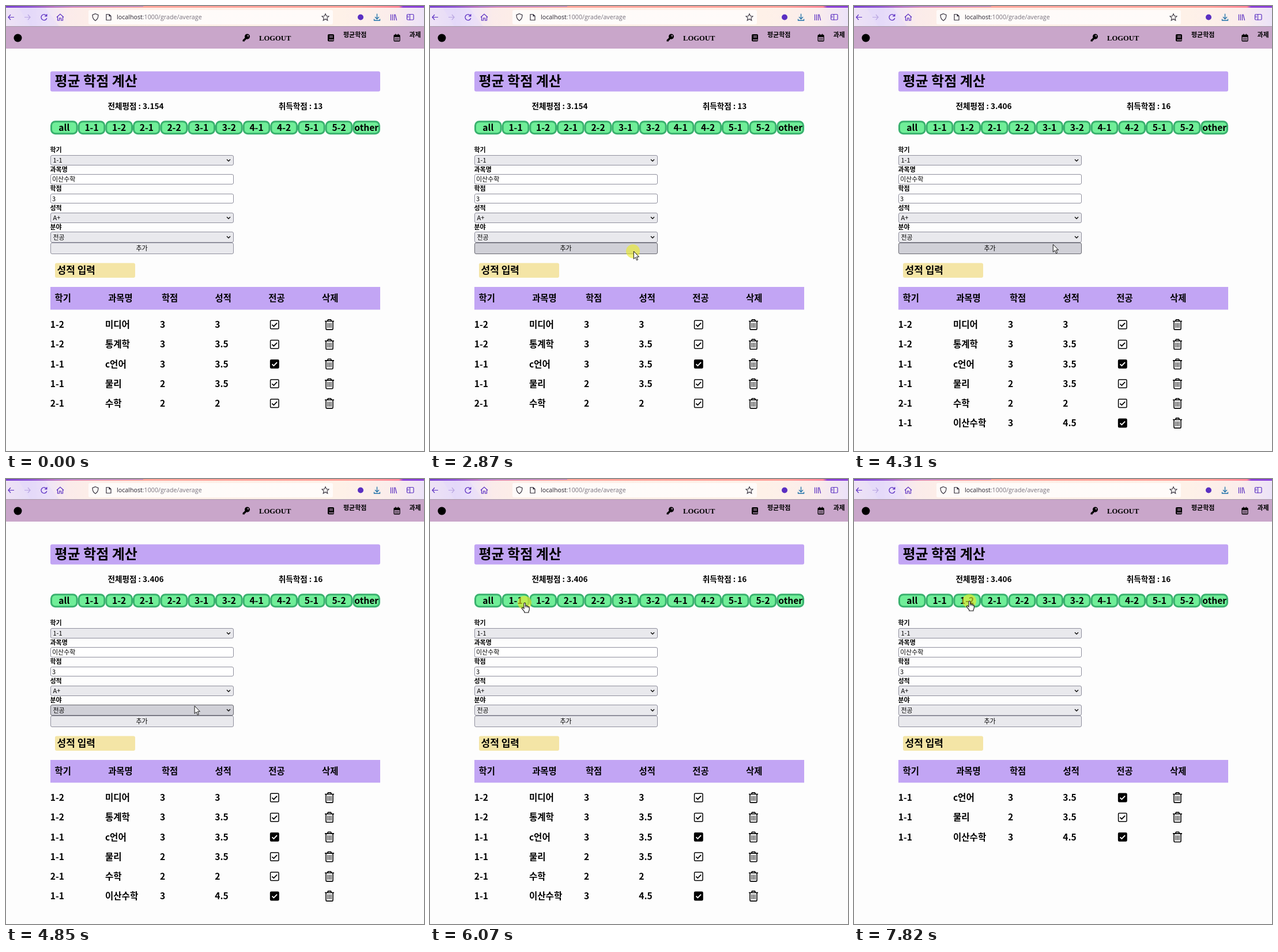
These frames come from a looping animation (725 by 773 pixels, 8 s). An HTML page with a canvas:

```html
<!DOCTYPE html>
<html lang="ko">
<head>
<meta charset="utf-8">
<title>평균 학점 계산</title>
<style>
html, body { margin: 0; width: 100%; height: 100%; overflow: hidden; background: #fdfdfd; }
canvas { display: block; }
</style>
</head>
<body>
<canvas id="stage" width="725" height="773"></canvas>
<script>
const ctx = document.getElementById('stage').getContext('2d');
const LOOP = 8000;
const KR = '"Noto Sans CJK KR", "Noto Sans CJK", sans-serif';
const LILAC = '#c2a5f4', INK = '#000', PURPLE = '#5a2fc2';

const ADD_TIME = 3320, CLEAR_TIME = 6270, FILTER_TIME = 6540;
const CLICKS = [[2870, 2980], [6052, 6200], [7820, LOOP]];
const PRESS = [2930, 2980];
// start, end, steps, x0, y0, x1, y1
const MOVES = [
  [1330, 1680, 6, 658, 418, 353, 426],
  [4310, 4450, 3, 345, 414, 332, 402],
  [4780, 5260, 8, 329, 398, 289, 328],
  [5460, 5978, 8, 285, 322, 165, 215],
  [7200, 7680, 7, 168, 215, 201, 212]
];

const FILTERS = ['all', '1-1', '1-2', '2-1', '2-2', '3-1', '3-2', '4-1', '4-2', '5-1', '5-2', 'other'];
const FIELDS = [
  { label: '학기', labelY: 250, y: 259, h: 18, value: '1-1', kind: 'select' },
  { label: '과목명', labelY: 284, y: 292, h: 18, value: '이산수학', kind: 'input' },
  { label: '학점', labelY: 317, y: 326, h: 17, value: '3', kind: 'input' },
  { label: '성적', labelY: 351, y: 359, h: 18, value: 'A+', kind: 'select' },
  { label: '분야', labelY: 384, y: 392, h: 19, value: '전공', kind: 'select' },
  { y: 411, h: 20, value: '추가', kind: 'button' }
];
const COURSES = [
  ['1-2', '미디어', '3', '3', false],
  ['1-2', '통계학', '3', '3.5', false],
  ['1-1', 'c언어', '3', '3.5', true],
  ['1-1', '물리', '2', '3.5', false],
  ['2-1', '수학', '2', '2', false],
  ['1-1', '이산수학', '3', '4.5', true]
];

const within = (t, [a, b]) => t >= a && t < b;

function text(str, x, cy, size, { weight = 700, align = 'left', color = INK, family = KR } = {}) {
  ctx.font = `${weight} ${size}px ${family}`;
  ctx.textAlign = align;
  ctx.fillStyle = color;
  ctx.fillText(str, x, cy + size * 0.37);
  return ctx.measureText(str).width;
}

function rect(x, y, w, h, fill) {
  ctx.fillStyle = fill;
  ctx.fillRect(x, y, w, h);
}

function box(x, y, w, h, r, fill, stroke, width = 1) {
  ctx.beginPath();
  ctx.roundRect(x, y, w, h, r);
  paint(fill, stroke, width);
}

function dot(x, y, r, fill, stroke, width = 1) {
  ctx.beginPath();
  ctx.arc(x, y, r, 0, Math.PI * 2);
  paint(fill, stroke, width);
}

function shape(d, x, y, fill, stroke, width = 1) {
  const path = new Path2D(d);
  ctx.save();
  ctx.translate(x, y);
  paint(fill, stroke, width, path);
  ctx.restore();
}

function paint(fill, stroke, width, path) {
  if (fill) {
    ctx.fillStyle = fill;
    path ? ctx.fill(path) : ctx.fill();
  }
  if (stroke) {
    ctx.strokeStyle = stroke;
    ctx.lineWidth = width;
    path ? ctx.stroke(path) : ctx.stroke();
  }
}

function gradient(x0, x1, stops) {
  const g = ctx.createLinearGradient(x0, 0, x1, 0);
  stops.forEach(([p, c]) => g.addColorStop(p, c));
  return g;
}

function drawBrowser() {
  rect(0, 0, 725, 36, gradient(0, 725, [
    [0, '#eee2f5'], [0.06, '#e6dcf8'], [0.1, '#efe5f7'], [0.15, '#fbebea'], [0.22, '#fdeee7'],
    [0.8, '#fef1e8'], [0.92, '#fbedeb'], [1, '#ece2f8']]));
  shape('M22 3H68L92 35H42Z', 0, 0, 'rgba(222,210,250,.3)');
  rect(0, 0, 725, 3, gradient(0, 725, [
    [0, '#7b40d2'], [0.06, '#8f55d4'], [0.16, '#e08fb4'], [0.33, '#ffa69b'], [0.85, '#ffa099'],
    [0.94, '#ff8698'], [0.95, '#8b40d8'], [1, '#8b40d8']]));
  rect(84, 0, 154, 1, '#a184dc');
  rect(0, 35, 725, 1, '#a99aa9');
  box(143, 7, 424, 25, 3, 'rgba(255,255,255,.75)');

  shape('M5 0H-5M-1 -4.5L-5 0L-1 4.5', 9, 19.5, null, PURPLE, 1.2);
  shape('M-5 0H5M1 -4.5L5 0L1 4.5', 37, 19.5, null, '#b9a6e2', 1.2);
  shape('M4.2 -2.5A5 5 0 1 0 4.8 1.5M4.8 -5.5V-2H1.2', 66, 19.5, null, PURPLE, 1.3);
  shape('M-6 0L0 -5.5L6 0M-4.5 -1V5.5H-1.5V1.5H1.5V5.5H4.5V-1', 94, 19.5, null, PURPLE, 1.2);
  shape('M0 -6L5 -4C5 1 3.5 4 0 6C-3.5 4 -5 1 -5 -4Z', 155, 19.5, null, '#35313d', 1.2);
  shape('M-4 -5H1L4 -2V5H-4ZM1 -5V-2H4', 178, 19.5, null, '#35313d', 1.2);
  shape('M0 -6L1.8 -2L6 -1.6L2.8 1.2L3.8 5.5L0 3.2L-3.8 5.5L-2.8 1.2L-6 -1.6L-1.8 -2Z', 554, 19.5, null, '#35313d', 1.1);
  const url = { weight: 400, family: '"Open Sans", "Noto Sans", sans-serif' };
  const hostWidth = text('localhost', 192, 19.5, 10.7, { ...url, color: '#26222e' });
  text(':1000/grade/average', 192 + hostWidth, 19.5, 10.7, { ...url, color: '#77717d' });

  dot(615, 19.5, 5, PURPLE);
  shape('M0 -6V3M-3.5 -.5L0 3L3.5 -.5M-5 3V5.5H5V3', 643.5, 19.5, null, '#1b6fa8', 1.3);
  shape('M-4.5 -5V5.5M-1.5 -5V5.5M1.5 -5V5.5M3 -5L5.5 5.5', 672, 19.5, null, PURPLE, 1.2);
  box(695.5, 14.5, 11.5, 9.5, 1.5, null, PURPLE, 1.2);
  shape('M0 -5V5M-4 -2H-2M-4 0H-2', 700.5, 19.5, null, PURPLE, 1.1);
}

function drawNav() {
  rect(0, 36, 725, 38, '#c9a6ca');
  dot(20.5, 55.5, 7, INK);
  // key
  shape('M0 0L-8 7.5V10H-4.5V8H-2.5V6H0L3 3Z', 418.5, 51.5, INK);
  dot(418.5, 53, 4.5, INK);
  dot(419.8, 51.8, 1.2, '#c9a6ca');
  text('LOGOUT', 439, 55.5, 12.6, { family: '"Liberation Serif", serif' });
  // book
  box(558, 49, 11, 12.5, 2, INK);
  rect(561, 51.5, 6, 1, '#c9a6ca');
  rect(561, 53.7, 6, 1, '#c9a6ca');
  rect(560, 58.2, 8.5, 1.3, '#c9a6ca');
  text('평균학점', 585, 50, 11, { weight: 900 });
  // calendar
  box(673, 50.5, 10, 10.5, 1.2, null, INK, 1.3);
  rect(673, 51, 10, 3, INK);
  rect(675, 48.5, 1.4, 3, INK);
  rect(679.7, 48.5, 1.4, 3, INK);
  for (let i = 0; i < 6; i++) rect(674.8 + i % 3 * 2.4, 55.4 + Math.floor(i / 3) * 2.4, 1.5, 1.5, INK);
  text('과제', 699.5, 50, 11, { weight: 900 });
}

function drawSummary(added) {
  box(77, 113.5, 572, 35, 3, LILAC);
  text('평균 학점 계산', 84.5, 130, 24);
  text(`전체평점 : ${added ? '3.406' : '3.154'}`, 225, 174, 13.6, { align: 'center' });
  text(`취득학점 : ${added ? 16 : 13}`, 511, 174, 13.6, { align: 'center' });
  const w = 572 / FILTERS.length;
  FILTERS.forEach((name, i) => {
    box(78.5 + i * w, 200.7, w - 3, 21, 7, '#70ee98', '#39b16e', 3);
    text(name, 77 + (i + 0.5) * w, 211, 15.6, { align: 'center' });
  });
}

function drawForm(mouse, pressed) {
  for (const f of FIELDS) {
    const hover = hits(mouse, f);
    if (f.label) text(f.label, 76.5, f.labelY, 11, { weight: 900 });
    let fill = '#fff';
    if (f.kind !== 'input') fill = hover ? '#d0d0d7' : '#e9e9ed';
    if (f.kind === 'button' && pressed) fill = '#b1b1b9';
    box(77.5, f.y + 0.5, 317, f.h - 1, 2.5, fill, hover ? '#67676f' : '#8f8f9d');
    const x = { select: 81.5, input: 80, button: 235.5 }[f.kind];
    text(f.value, x, f.y + f.h / 2 + 0.3, 11, { weight: 400, align: f.kind === 'button' ? 'center' : 'left' });
    if (f.kind === 'select') shape('M-3 -1.5L0 1.5L3 -1.5', 386, f.y + f.h / 2, null, '#111', 1.5);
  }
}

function drawCheck(x, y, filled) {
  box(x - 7.2, y - 7.2, 14.4, 14.4, 1.5, filled ? INK : null, INK, 1.5);
  shape('M-4.3 .2L-1.4 3L4.3 -2.9', x, y, null, filled ? '#fff' : INK, 1.8);
}

function drawTrash(x, y) {
  shape('M-8 -6H8M-3.6 -6L-2.4 -8.6H2.4L3.6 -6M-6 -6V7.2Q-6 8.6 -4.6 8.6H4.6Q6 8.6 6 7.2V-6',
    x, y, null, INK, 1.6);
  shape('M-2.8 -3V5.6M0 -3V5.6M2.8 -3V5.6', x, y, null, INK, 1.1);
}

function drawTable(t) {
  box(85, 446.5, 139, 25.5, 3, '#f4e5a6');
  text('성적 입력', 88.5, 458.5, 17);
  rect(77, 488, 572, 39.5, LILAC);
  ['학기', '과목명', '학점', '성적', '전공', '삭제'].forEach((name, i) => text(name, 84.5 + i * 92.7, 507, 15.4));

  let rows = COURSES.slice(0, t < ADD_TIME ? 5 : 6);
  if (t >= CLEAR_TIME) rows = t < FILTER_TIME ? [] : rows.filter(r => r[0] === '1-1');
  rows.forEach((row, i) => {
    const y = 553.5 + i * 34.2;
    row.slice(0, 4).forEach((cell, c) => text(cell, 76.7 + c * 95.2, y, 15.6));
    drawCheck(465.8, y, row[4]);
    drawTrash(561, y);
  });
}

function mouseAt(t) {
  const move = MOVES.filter(m => t >= m[0]).pop();
  if (!move) return null;
  const [start, end, steps, x0, y0, x1, y1] = move;
  const last = steps - 1;
  const step = Math.min(last, Math.floor((t - start) / (end - start) * last + 1e-6));
  const p = step / last, eased = p * p * (3 - 2 * p);
  return { x: x0 + (x1 - x0) * eased, y: y0 + (y1 - y0) * eased };
}

function hits(mouse, f) {
  return !!mouse && mouse.x >= 77 && mouse.x < 395 && mouse.y >= f.y && mouse.y < f.y + f.h;
}

function drawMouse(t, mouse) {
  if (!mouse) return;
  const { x, y } = mouse;
  if (CLICKS.some(span => within(t, span))) dot(x - 1, y, 12, 'rgba(236,236,40,.62)');
  if (FIELDS.some(f => f.kind === 'input' && hits(mouse, f))) {
    shape('M-2.5 -6H-.7L0 -5.3L.7 -6H2.5M0 -5.3V5.3M-2.5 6H-.7L0 5.3L.7 6H2.5', x + 0.5, y + 0.5, null, '#111', 1.1);
  } else if (y >= 199 && y < 223) {
    shape('M-2 1.2Q-2 0 -.7 0Q.7 0 .7 1.2V5.2Q2.8 4.6 3.2 6Q5 5.4 5.4 6.8Q7.3 6.4 7.3 8.2V11.5' +
      'Q7.3 13.5 6 15V17H-1.2V15.4L-5.4 10.2Q-6.2 8.4 -4.6 8.2Q-3.4 8.2 -2 10Z', x, y, '#fff', '#111', 1.1);
    shape('M.7 5.2V8M3.2 6V8.4M5.4 6.8V8.8', x, y, null, '#111', 0.9);
  } else {
    shape('M0 0V13.4L3.1 10.6L5.2 15.6L7.3 14.7L5.2 9.8H9.3Z', x + 0.3, y, '#fff', '#111', 1);
  }
}

function frame(now) {
  const t = now % LOOP;
  const mouse = mouseAt(t);
  rect(0, 0, 725, 773, '#fdfdfd');
  drawBrowser();
  drawNav();
  drawSummary(t >= ADD_TIME);
  drawForm(mouse, within(t, PRESS));
  drawTable(t);
  drawMouse(t, mouse);
}

const began = performance.now();
function tick() {
  frame(performance.now() - began);
  requestAnimationFrame(tick);
}
tick();
</script>
</body>
</html>
```
